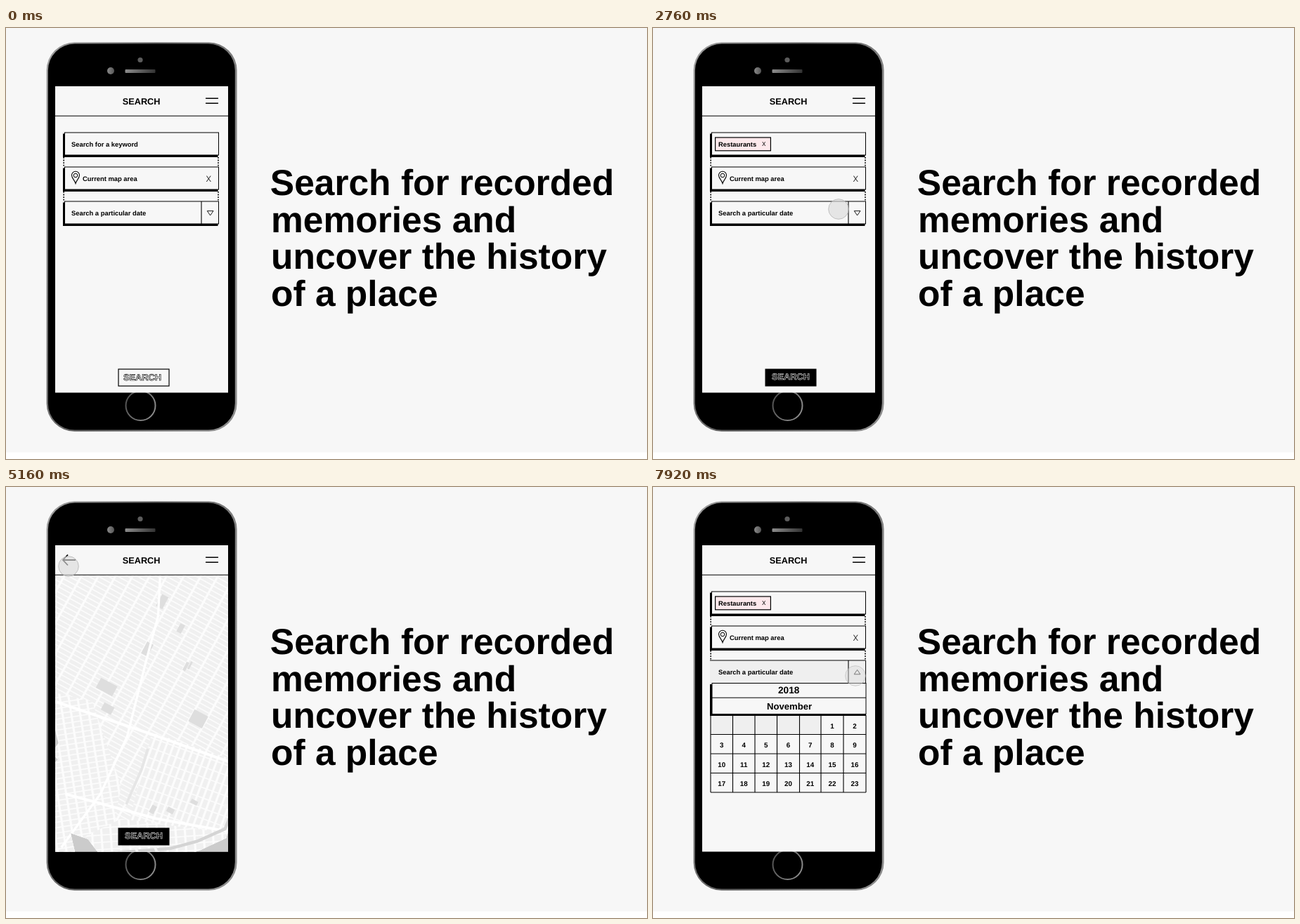
An HTML page for the animation above (8000 ms loop, 912 by 614 pixels).

```html
<!DOCTYPE html>
<html lang="en">
<head>
<meta charset="utf-8">
<title>Search for a place</title>
<style>
  html, body { margin: 0; width: 100%; height: 100%; overflow: hidden; background: #fff; }
  svg { display: block; width: 912px; height: 614px; }
  text { font-family: "Liberation Sans", Arial, sans-serif; font-weight: 700; text-rendering: geometricPrecision; }
  .thin { font-family: Inter, sans-serif; font-weight: 400; }
  .mid { text-anchor: middle; }
</style>
</head>
<body>
<svg id="stage" viewBox="0 0 912 614" xmlns="http://www.w3.org/2000/svg"></svg>
<script>
const PAPER = '#f7f7f7', GREY = '#efefef', LAND = '#f0f0f0', WATER = '#cbcbcb', INK = '#000';
const LOOP = 8000, STEP = 120;

// ---- drawing helpers ----
const rect = (x, y, w, h, fill, more = '') =>
  `<rect x="${x}" y="${y}" width="${w}" height="${h}" fill="${fill}" ${more}/>`;
const path = (d, stroke = INK, width = 1, fill = 'none', more = '') =>
  `<path d="${d}" stroke="${stroke}" stroke-width="${width}" fill="${fill}" ${more}/>`;
const text = (x, y, size, str, more = '') =>
  `<text x="${x}" y="${y}" font-size="${size}" ${more}>${str}</text>`;
const group = (id, body, more = '') => `<g id="${id}" ${more}>${body}</g>`;
const clip = (id, body) => `<clipPath id="${id}">${body}</clipPath>`;
const range = (n, f) => Array.from({ length: n }, (_, i) => f(i)).join('');
const mid = 'class="mid"', thinMid = 'class="thin mid"';

// ---- phone ----
function phone() {
  return rect(57.6, 20.4, 271, 554.4, 'url(#rim)', 'rx="40"') +
    rect(59.8, 22.6, 266, 550, INK, 'rx="38"') +
    '<circle cx="191" cy="45.5" r="3.6" fill="#5c5c5c"/>' +
    '<circle cx="149" cy="61" r="5" fill="url(#lens)"/>' +
    rect(169.5, 59, 43, 5, 'url(#slot)', 'rx="1"') +
    '<circle cx="191.5" cy="538" r="21" fill="none" stroke="url(#ring)" stroke-width="2"/>' +
    rect(70, 83, 246, 436.5, PAPER);
}

function header() {
  return rect(70, 83, 246, 42, PAPER) +
    text(192.6, 108.6, 12.7, 'SEARCH', mid) +
    path('M284 100.2H302M284 107.3H302', INK, 1.6) +
    path('M70 125.3H316', INK, 1.1) +
    group('back', path('M99 104H81M88 96.5L81 104L88 111.5', INK, 1.8));
}

// ---- form ----
const box = y => rect(81, y + 1.5, 220.5, 33.5, INK) +
  rect(83.5, y, 219, 32, PAPER, `stroke="${INK}" stroke-width="1"`);
const greyBox = y => rect(81, y, 221.5, 33, GREY) +
  path(`M81 ${y}H302.6V${y + 33}`);
const label = (x, y, str) => text(x, y, 9.4, str);

function form() {
  const dots = [184, 233].map(y =>
    path(`M82.2 ${y}V${y + 14}M302 ${y}V${y + 14}`, INK, 1.6, 'none', 'stroke-dasharray="1.8 1.8"')).join('');
  const tag = rect(88.6, 156, 78.8, 18.8, '#fde9ec', `stroke="${INK}" stroke-width="1.2"`) +
    label(93, 168.7, 'Restaurants') + text(157.8, 168.2, 8, 'X', thinMid);
  const pin = path('M99 221.5C97.5 216.5 93.5 214 93.5 209.8A5.5 5.5 0 0 1 104.5 209.8C104.5 214 100.5 216.5 99 221.5Z', INK, 1.1) +
    '<circle cx="99" cy="210" r="2.8" fill="none" stroke="#000"/>';
  return dots +
    group('keyBox', box(149)) + group('keyFocus', greyBox(149)) +
    group('hint', label(93, 168.6, 'Search for a keyword')) +
    group('typing', text(93, 168.7, 9.4, '', 'id="typed"') + path('M0 157.5V172.5', INK, 1, 'none', 'id="caret"')) +
    group('tag', tag) +
    box(198) + pin + label(109, 217.8, 'Current map area') +
    text(288.3, 218.6, 11.5, 'X', 'class="thin mid" style="font-weight:300"') +
    group('dateBox', box(247)) + group('dateFocus', greyBox(247)) +
    label(93, 267, 'Search a particular date') +
    path('M278 247V279.5', INK, 1.1) +
    path('M286.3 260.6H295L290.6 267Z', INK, .9, 'none', 'id="arrow"');
}

function button() {
  const word = (x, y, ink) =>
    text(x, y, 12.8, 'SEARCH', `${mid} fill="none" stroke="${ink}" stroke-width=".65"`);
  return group('idle', rect(160, 486, 72, 24, PAPER, 'stroke="#000" stroke-width="1.2"') + word(194, 502.4, INK)) +
    group('ready', rect(159.5, 485.5, 73, 25, INK) + word(196, 501.4, '#e4e4e4'));
}

// ---- keyboard ----
function keyboard() {
  const key = (x, y, w) => rect(x, y, w, 24.8, '#f8f8f8', 'rx="3.5" stroke="#000" stroke-width="1"');
  const row = (str, cx, y) => [...str].map((c, i) => {
    const x = cx + i * 22.47;
    return key(x - 9.5, y, 19) + text(x, y + 17.5, 14, c, thinMid);
  }).join('');
  const face = '<circle cx="121" cy="495" r="6" fill="none" stroke="#000"/>' +
    '<circle cx="118.8" cy="493" r=".9"/><circle cx="123.2" cy="493" r=".9"/>' +
    path('M117 495.6H125A4 4 0 0 1 117 495.6Z', INK, .7);
  return rect(70, 378, 246, 143, '#ececec') +
    row('QWERTYUIOP', 90.8, 387) + row('ASDFGHJKL', 101.8, 419) + row('ZXCVBNM', 124.3, 451.3) +
    key(81.3, 451.3, 24.5) + path('M93.5 459L99 464.3H96.3V468H90.7V464.3H88Z', INK, .9) +
    key(277.3, 451.3, 24.5) + path('M283 464L287 459.7H296V468.3H287ZM288.6 461.7L293.4 466.3M293.4 461.7L288.6 466.3', INK, .9) +
    key(81, 483, 24) + text(92.8, 499, 9.5, '123', thinMid) +
    key(109, 483, 24) + face +
    key(137, 483, 109) + text(191.5, 499.3, 10, 'space', thinMid) +
    key(249.5, 483, 52) + text(275.5, 499.3, 10, 'Done', thinMid);
}

// ---- map ----
function grid(turn, cx, cy, street, avenue, zone) {
  const reach = 330;
  const lines = (gap, dir) => range(Math.ceil(2 * reach / gap), i => {
    const p = (i * gap - reach).toFixed(1);
    return dir === 'H' ? `M${-reach} ${p}H${reach}` : `M${p} ${-reach}V${reach}`;
  });
  const body = `<g transform="translate(${cx} ${cy}) rotate(${turn})">` +
    path(lines(street, 'H'), '#fcfcfc', 1.1) + path(lines(avenue, 'V'), '#fcfcfc', 2.1) + '</g>';
  const id = 'zone' + turn;
  return clip(id, `<path d="${zone}"/>`) +
    `<g clip-path="url(#${id})">${path(zone, 'none', 0, LAND)}${body}</g>`;
}

function cityMap() {
  const land = 'M117 126L116 146L104 167L93 200L87 262L81 345L78 430L74 519H108L122 488L117 466L134 472L146 488L166 492L148 519H238L222 490L242 483L268 471L277 442L293 385L296 328L283 292L288 272L292 240L298 212L316 188V126Z';
  const parks = [
    [233, 158, 17, 10], [206, 241, 7, 13], [191.5, 287, 7, 13], [152, 324, 18, 11],
    [153, 345, 11, 8], [241, 355, 15, 13], [224, 267, 5, 9], [229, 304, 3, 9],
    [233, 303, 2, 8], [214, 444, 7, 5], [197, 443, 5, 8], [237, 436, 7, 4]
  ].map(([x, y, w, h]) =>
    rect(-w / 2, -h / 2, w, h, '#dedede', `transform="translate(${x} ${y}) rotate(28)"`)).join('');
  const piers = range(9, i => rect(70, 138 + i * 9, 11 + (i * 5) % 8, 4, '#e8e8e8', `transform="rotate(8 70 ${138 + i * 9})"`)) +
    rect(70, 128, 6, 100, '#e8e8e8') +
    range(5, i => rect(70, 405 + i * 20, 5, 9, '#e6e6e6')) +
    path('M283 488L298 510M292 485L304 504M316 496L302 519', '#ececec', 5);
  return rect(70, 126, 246, 394, WATER) +
    clip('land', `<path d="${land}"/>`) +
    '<g clip-path="url(#land)">' +
    grid(29, 193, 300, 4.6, 14.5, 'M70 126H316V519H70Z') +
    grid(-9, 110, 420, 5.2, 8.5, 'M70 322L138 338L166 420L150 519H70Z') +
    grid(20, 220, 420, 9.5, 6.4, 'M196 368L296 402L270 478H168Z') +
    grid(-4, 190, 480, 7, 9, 'M166 452L270 466L240 519H110L130 470Z') +
    parks +
    path('M192 384L186 404L171 438', '#e6e6e6', 2.6) +
    path('M126 126L108 170L98 220L92 280L85 345L84 430L78 519', '#fff', 2.6) +
    path('M182 126L204 215L202 255L190 300L172 372L146 428L108 480', '#fff', 2.2) +
    path('M84 332L196 370L294 405M112 428L200 452L268 464', '#fff', 2.6) +
    path('M276 440L267 462L240 474L214 481L150 486', '#d4d4d4', 3) +
    '</g>' +
    path('M118 131L138 129L164 134L161 148L148 153', WATER, 4.5) +
    path('M316 197L296 208L286 206L284 212L270 207', WATER, 4) +
    path('M80 361L100 366L103 378L96 388L103 396M80 378L92 382L88 398', WATER, 4) +
    piers +
    path('M266 439L316 459', '#f4f4f4', 4) +
    path('M192 464L216 519M176 470L196 519', '#f4f4f4', 2.5);
}

// ---- calendar ----
function calendar() {
  const xs = [82, 113.5, 145, 176.5, 208.5, 239, 271, 303];
  const ys = [325, 352.5, 380, 407.5, 435];
  const days = range(23, i => {
    const n = i + 5, c = n % 7, r = Math.floor(n / 7);
    return text((xs[c] + xs[c + 1]) / 2, ys[r] + 18.8, 9.8, i + 1, mid);
  });
  return rect(82, 325, 221, 110, PAPER) + rect(82, 325, 157, 27.5, GREY) +
    path(xs.map(x => `M${x} 325V435`).join('') + ys.map(y => `M82 ${y}H303`).join(''), INK, 1.1) + days +
    rect(81, 281, 222, 45, INK) + rect(84, 279.5, 219, 44, PAPER, 'stroke="#000"') +
    path('M84 300.2H303') +
    text(193.2, 294.2, 13.6, '2018', mid) + text(194, 317.2, 13.1, 'November', mid);
}

const ramp = (id, stops, more = '') => `<linearGradient id="${id}" ${more}>` +
  stops.map((c, i) => `<stop offset="${i / (stops.length - 1)}" stop-color="${c}"/>`).join('') + '</linearGradient>';

const heading = ['Search for recorded', 'memories and', 'uncover the history', 'of a place'];

document.getElementById('stage').innerHTML =
  '<defs>' +
  ramp('rim', ['#a0a0a0', '#5a5a5a', '#8c8c8c'], 'x2="1" y2=".4"') +
  ramp('lens', ['#8a8a8a', '#555']) + ramp('slot', ['#8c8c8c', '#333']) +
  ramp('ring', ['#4a4a4a', '#8a8a8a'], 'x2="1" y2=".5"') +
  clip('screen', rect(70, 83, 246, 436.5, INK)) +
  clip('unfold', rect(80, 279, 225, 0, INK, 'id="fold"')) +
  '</defs>' +
  rect(0, 0, 912, 604.5, PAPER) +
  heading.map((s, i) => text(i ? 377 : 375.8, 238 + i * 52.5, 51.5, s)).join('') +
  phone() +
  '<g clip-path="url(#screen)">' +
  group('form', form()) +
  group('mapPage', group('map', cityMap())) +
  group('button', button()) +
  group('calendar', calendar(), 'clip-path="url(#unfold)"') +
  group('keyboard', keyboard()) + header() +
  '</g>' +
  '<circle id="touch" r="14.3" fill="#dcdcdc" fill-opacity=".65" stroke="#b4b4b4" stroke-width=".8"/>';

// ---- motion ----
const el = id => document.getElementById(id);
const show = (id, on) => el(id).setAttribute('visibility', on ? 'inherit' : 'hidden');
const span = (t, a, b) => Math.min(1, Math.max(0, (t - a) / (b - a)));
const ease = p => p * p * (3 - 2 * p);

// time, x, y, opacity
const touchPath = [
  [120, 215, 310, 0], [360, 206, 265, .7], [600, 188, 175, 1], [720, 185, 162, 1],
  [960, 186, 158, .9], [1080, 188, 142, .8], [1320, 205, 230, .7], [1560, 235, 390, .6],
  [1800, 255, 466, .4], [1920, 261, 475, .35], [2160, 275, 494, .9], [2400, 275, 490, 1],
  [2640, 266, 366, 1], [2760, 264, 258, 1], [2880, 232, 206, 1], [3000, 192, 184, 1],
  [3240, 130, 195, 1], [3480, 110, 212, 1], [3720, 105, 216, .7], [4080, 105, 216, .7],
  [4440, 98, 175, .85], [4800, 90, 119, 1], [5160, 89, 113, 1], [5400, 89, 113, 1],
  [5640, 128, 143, 1], [5880, 236, 225, 1], [6120, 288, 265, 1], [6480, 288, 265, 1],
  [6600, 288, 264, .4], [6840, 288, 266, .9], [7920, 288, 269, .75], [8000, 288, 269, .75]
];

function touchAt(t) {
  const n = touchPath.findIndex(k => k[0] > t);
  if (n <= 0) return touchPath[0].slice(1);
  const a = touchPath[n - 1], b = touchPath[n], p = span(t, a[0], b[0]);
  return [1, 2, 3].map(i => a[i] + (b[i] - a[i]) * p);
}

function draw(t) {
  const focus = t >= 720 && t < 2280;
  const done = t >= 2280;
  const date = t >= 6720;
  const inMap = t > 3480 && t < 5280;

  show('keyBox', !focus);
  show('keyFocus', focus);
  show('hint', !focus && !done);
  show('typing', focus);
  show('tag', done);
  show('idle', !done);
  show('ready', done);
  show('button', t < 6960);

  const letters = 'Restaurants'.slice(0, Math.round(11 * span(t, 1080, 1800)));
  const typed = el('typed');
  typed.textContent = letters;
  const end = 94.5 + (letters ? typed.getComputedTextLength() : 0);
  el('caret').setAttribute('transform', `translate(${end} 0)`);

  const up = ease(span(t, 600, 960)) - ease(span(t, 2160, 2520));
  show('keyboard', up > 0);
  el('keyboard').setAttribute('transform', `translate(0 ${(1 - up) * 142})`);

  show('mapPage', inMap);
  show('back', inMap);
  el('mapPage').setAttribute('opacity', span(t, 3480, 3720));
  const zoom = 1 + .465 * ease(span(t, 3960, 5160));
  el('map').setAttribute('transform', `translate(171 408) scale(${zoom}) translate(-171 -408)`);

  show('dateBox', !date);
  show('dateFocus', date);
  el('arrow').setAttribute('transform', date ? 'rotate(180 290.6 263.7)' : '');
  el('fold').setAttribute('height', 157 * ease(span(t, 6840, 7920)));

  const [x, y, o] = touchAt(t);
  const touch = el('touch');
  touch.setAttribute('cx', x);
  touch.setAttribute('cy', y);
  touch.setAttribute('opacity', o);
}

let start;
function tick(now) {
  if (start === undefined) start = now;
  const t = (now - start) % LOOP;
  draw(t < 240 ? 0 : Math.floor(t / STEP) * STEP);
  requestAnimationFrame(tick);
}
draw(0);
requestAnimationFrame(tick);
</script>
</body>
</html>
```
